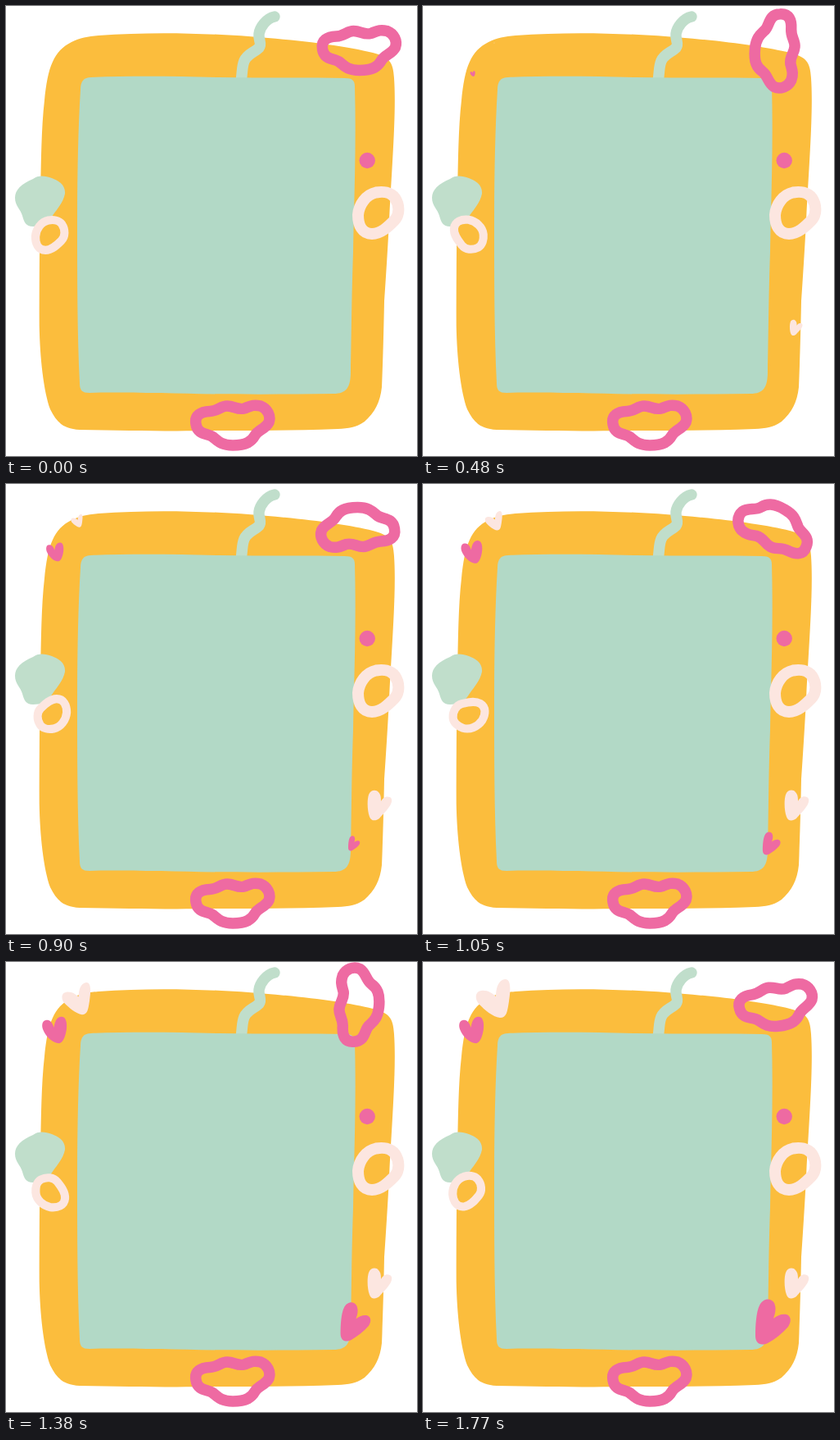
These frames come from a looping animation (502 by 549 pixels, 1.8 s). An HTML page:

```html
<!DOCTYPE html>
<html lang="en">
<head>
<meta charset="utf-8">
<title>Playful frame</title>
<style>
  html, body { margin: 0; width: 100%; height: 100%; overflow: hidden; background: #fff; }
  svg { display: block; width: 502px; height: 549px; }
  .pink { fill: #ee6aa2; }
  .pale { fill: #fce6e0; }
  .mint { fill: #c0decb; }
  .ring { fill: none; }
</style>
</head>
<body>
<svg viewBox="0 0 502 549">
  <defs>
    <path id="lips" class="ring" stroke="#ee6aa2" stroke-width="13.5" transform="translate(-276 -511)"
      d="M232 510C230 499 238 495 249 494.5C259 494 262 488 270 488C279 488 282 493 291 491C299 488 302 486 311 488C319 491 324 500 321 508C317 516 308 517 304 524C300 531 294 536 277 536C263 536 259 531 253 526C247 521 234 524 232 510Z"/>
    <path id="hoop" class="ring" stroke="#fce6e0" stroke-width="14" transform="translate(-454.5 -252.5)"
      d="M452 227.5C460 226 470 227 475 234C481 243 481 255 474 262C467 269 458 278 447 278C435 278 430 267 430 255C431 242 440 230 452 227.5Z"/>
  </defs>

  <path fill="#fbbd3d" d="M113 36C180 31 250 33 320 39C370 43 420 50 448 57C468 62 473 68 474 88C477 130 471 200 468 262C466 300 464 330 462 360C461 410 460 440 459 465C457 484 450 496 438 507C428 514 420 515 405 516C350 518 300 518 258 518C200 519 150 518 90 517C70 516 62 508 54 492C46 470 41.5 430 40.7 390C40.7 330 41 280 42 230C43 190 43 150 47 115C51 75 58 55 80 44C90 39 100 37 113 36Z"/>
  <path class="ring" stroke="#c0decb" stroke-width="13.5" stroke-linecap="round"
    d="M328 13C318 15 310 26 309 34C308 41 313 46 309 51C303 57 295 58 291 67C288 74 289 80 287 92"/>
  <path fill="#b2d9c6" d="M104 87C160 85 210 86 260 87C320 88 370 87 414 88C423 88 426 91 426 98C428 170 425 240 424 300C422 360 422 400 421 446C421 465 416 473 400 473C330 474 250 474 190 472C150 472 130 471 102 472C93 472 90 469 90 460C87 400 87 330 87 270C87 210 88 150 91 102C91 92 95 87 104 87Z"/>
  <path class="mint" d="M33 211C39 206 48 207 56 210C64 213 73 218 72 229C70 240 62 248 56 257C51 266 42 269 33 269C24 269 22 263 20 256C18 248 11 244 11 234C11 224 19 217 33 211Z"/>
  <circle class="pink" cx="441.2" cy="188.5" r="9.7"/>
  <use href="#hoop" x="454.5" y="252.5"/>
  <use href="#lips" x="276" y="511"/>

  <g class="spin" data-at="55 280"><use href="#hoop" transform="translate(-1.5 -.5) scale(.72)"/></g>
  <g class="spin" data-at="430.5 53.5"><use href="#lips"/></g>

  <!-- data-grow: pivot x, pivot y, start ms, duration ms -->
  <path class="pale" data-grow="455 393 0 930"
    d="M458 387C460 383 464 380 469 382C473 384 471 390 468 394C464 400 459 404 456 408C452 411 446 412 444 406C441 398 441 385 443 379C445 373 452 372 455 376C458 379 458 383 458 387Z"/>
  <path class="pink" data-grow="61 82.5 130 1200"
    d="M58.5 80C60 71 63 66 69 67C75 68 75 80 73 87C71 95 68 100 63 99C56 98 48 90 45 82C43 76 45 71 49 71C54 70 57 75 58.5 80Z"/>
  <path class="pale" data-grow="87 45 365 1370"
    d="M89 42C89 32 92 22 100 21C108 20 107 36 105 48C103 61 102 68 94 68C85 67 75 58 69 52C63 46 63 36 71 35C79 34 84 38 89 42Z"/>
  <path class="pink" data-grow="424 438 405 1280"
    d="M428 435C433 431 438 429 444 430C450 432 450 439 446 445C439 453 430 460 421 465C412 469 406 465 406 456C406 443 407 427 411 419C415 410 425 409 429 416C432 423 430 429 428 435Z"/>
</svg>
<script>
const LOOP = 1800, STEP = 30;
const spinners = [...document.querySelectorAll('.spin')];
const hearts = [...document.querySelectorAll('[data-grow]')].map(el => ({
  el, grow: el.dataset.grow.split(' ').map(Number)
}));

function ease(x) {
  x = Math.min(1, Math.max(0, x));
  return x * x * (3 - 2 * x);
}

function draw(t) {
  for (const el of spinners)
    el.setAttribute('transform', `translate(${el.dataset.at}) rotate(${t / LOOP * 360})`);
  for (const { el, grow: [x, y, start, span] } of hearts) {
    const s = ease((t - start) / span);
    el.setAttribute('visibility', s ? 'visible' : 'hidden');
    el.setAttribute('transform', `translate(${x} ${y}) scale(${s}) translate(${-x} ${-y})`);
  }
}

const begin = performance.now();
function tick() {
  const t = (performance.now() - begin) % LOOP;
  draw(Math.floor(t / STEP) * STEP);
  requestAnimationFrame(tick);
}
tick();
</script>
</body>
</html>
```
